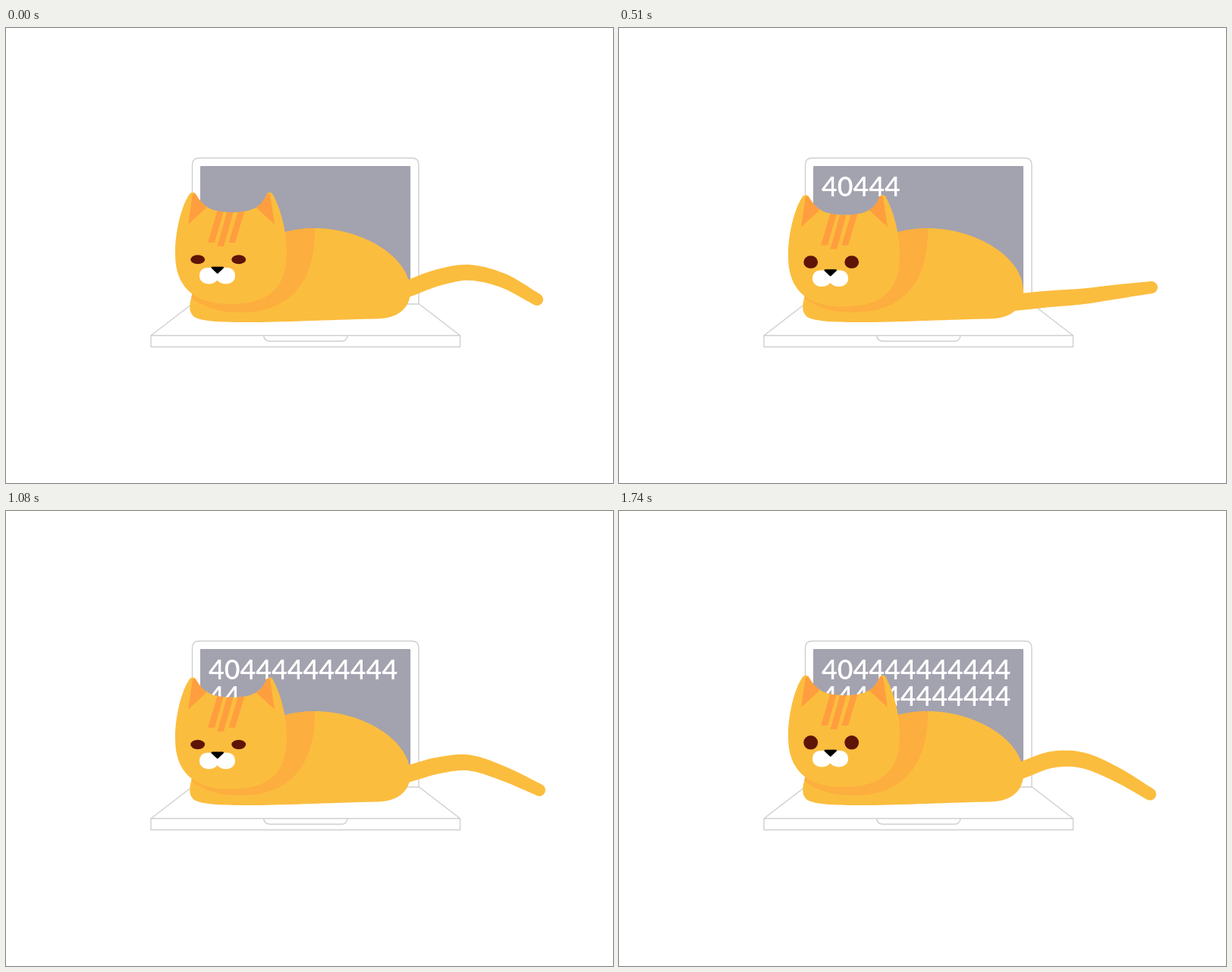
Animation of 800 by 600 pixels, one loop 1.8 s. Source, as an HTML page with a canvas:

```html
<!DOCTYPE html>
<html lang="en">
<head>
<meta charset="utf-8">
<title>Cat on a laptop</title>
<style>
html, body { margin: 0; width: 100%; height: 100%; overflow: hidden; background: #fff; }
canvas { display: block; width: 800px; height: 600px; }
</style>
</head>
<body>
<canvas id="stage" width="800" height="600"></canvas>
<script>
const ctx = document.getElementById('stage').getContext('2d');
const LOOP = 1800, STEP = 30, LAST = 1740;
const FUR = '#fbbd3e', SHADE = '#fcae3e', MARK = '#ff9e3e', EYE = '#5e1407';
const LINE = '#cfcfd1', SCREEN = '#a3a2af';

const body = new Path2D(`M246 350 L340 285 L366 269.5 Q386 264 407 264
  C470 264 533 302 533 347 C533 370 515 384 487 383.5
  C420 385 350 388.5 313 388 C285 388 252 387 246 379 C240 372 242 362 246 350Z`);
const shadow = new Path2D(`M340 250 L407 250 L407 264 C408 340 370 375 309 375
  C285 375 262 370 243 355 L243 330Z`);
const head = new Path2D(`M241.5 219.5 C231 235 222.5 270 223 298
  C223 340 246 364 295 364 C345 364 370 345 370 295
  C370 270 363 240 352 220 C350 216 345.5 216 343.5 219
  C338 234 326 243 300 243 C270 243 260 236 250 219 C248 216 244 216 241.5 219.5Z`);
const marks = new Path2D(`M246 219 L254 217 L264 237 L240 259Z
  M348 219 L340 217 L330 237 L354 259Z
  M280 236 h8.5 L275 283 h-9Z M293 236 h8.5 L287 288 h-8.5Z M307.5 236 h8.5 L302 283 h-8.5Z`);
const muzzle = new Path2D(`M266 316 L291 316 C298 316 302 320 302 327
  C302 333 297 337.5 290 337.5 C285 337.5 281 336 278.5 332.5
  C276 336 272 337.5 267 337.5 C260 337.5 255 333 255 327 C255 320 259 316 266 316Z`);
const nose = new Path2D(`M272 314.7 L285.5 314.7 Q288 315.2 286.4 317
  L279.8 323.3 Q278.7 324.3 277.6 323.3 L271 317 Q269.5 315.2 272 314.7Z`);
const laptop = new Path2D(`M245.5 364 V180.5 Q245.5 171.5 254.5 171.5 H535 Q544 171.5 544 180.5 V364
  M245 364 H544.5 L598.5 405.5 V420.5 H191 V405.5 L245 364 M191 405.5 H598.5
  M339.5 406 Q341 413 348 413 H442 Q449 413 450 406`);

// Each pose: time, heights of the tail at x = 530, 570, 610, 655, then the tip x, y
const tailPoses = [
  [0, 343.5, 329, 322.5, 333, 700, 358],
  [210, 352, 342, 337, 337, 700.5, 346],
  [510, 361, 357, 354, 348, 702, 342],
  [720, 356, 349.5, 345, 346, 703.5, 353],
  [1080, 346.5, 335.5, 332, 346, 703, 368],
  [1380, 342, 328, 328.5, 347, 700, 373.5]
];
const headKeys = [[0, 0], [820, 5], [1370, 0]];
const eyeKeys = [[0, 6], [120, 6], [600, 8.6], [960, 6], [1650, 9.3]];

// Cosine easing between keys
function ease(keys, t) {
  for (let i = 1; i < keys.length; i++) {
    const [t0, a] = keys[i - 1], [t1, b] = keys[i];
    if (t < t1) return a + (b - a) * (1 - Math.cos(Math.PI * (t - t0) / (t1 - t0))) / 2;
  }
  return keys[keys.length - 1][1];
}

// Smooth curve through rows; column 0 is the parameter
function spline(rows, u, col, flatEnds) {
  const n = rows.length - 1;
  if (u >= rows[n][0]) return rows[n][col];
  let i = 0;
  while (u >= rows[i + 1][0]) i++;
  const slope = k => {
    if (flatEnds && (k === 0 || k === n)) return 0;
    const a = rows[Math.max(0, k - 1)], b = rows[Math.min(n, k + 1)];
    return (b[col] - a[col]) / (b[0] - a[0]);
  };
  const d = rows[i + 1][0] - rows[i][0], s = (u - rows[i][0]) / d;
  const s2 = s * s, s3 = s2 * s;
  return (2 * s3 - 3 * s2 + 1) * rows[i][col] + (s3 - 2 * s2 + s) * d * slope(i)
    + (3 * s2 - 2 * s3) * rows[i + 1][col] + (s3 - s2) * d * slope(i + 1);
}

function fill(path, color) {
  ctx.fillStyle = color;
  ctx.fill(path);
}

function fillInside(clip, path, color) {
  ctx.save();
  ctx.clip(clip);
  fill(path, color);
  ctx.restore();
}

function drawTail(t) {
  const [y0, y1, y2, y3, tipX, tipY] = [1, 2, 3, 4, 5, 6].map(c => spline(tailPoses, t, c, true));
  const knots = [[505, y0 + (y0 - y1) * 0.6], [530, y0], [570, y1], [610, y2], [655, y3], [tipX, tipY]];
  const top = [], bottom = [], N = 60;
  let angle = 0;
  for (let i = 0; i <= N; i++) {
    const x = 505 + (tipX - 505) * i / N, y = spline(knots, x, 1);
    const xa = Math.min(x, tipX - 1);
    angle = Math.atan2(spline(knots, xa + 1, 1) - spline(knots, xa, 1), 1);
    const s = Math.max(0, (x - 530) / (tipX - 530)), w = 11 - 3 * s * s;
    top.push([x + Math.sin(angle) * w, y - Math.cos(angle) * w]);
    bottom.unshift([x - Math.sin(angle) * w, y + Math.cos(angle) * w]);
  }
  ctx.beginPath();
  top.forEach(p => ctx.lineTo(...p));
  ctx.arc(tipX, tipY, 8, angle - Math.PI / 2, angle + Math.PI / 2);
  bottom.forEach(p => ctx.lineTo(...p));
  ctx.fillStyle = FUR;
  ctx.fill();
}

function drawLaptop(t) {
  ctx.strokeStyle = LINE;
  ctx.lineWidth = 1.4;
  ctx.lineJoin = 'round';
  ctx.stroke(laptop);
  ctx.fillStyle = SCREEN;
  ctx.beginPath();
  ctx.roundRect(256, 182, 277, 168, 1);
  ctx.fill();

  const count = Math.max(0, Math.min(24, Math.floor((t - 130) * 3 / 200)));
  const text = ('40' + '4'.repeat(22)).slice(0, count);
  ctx.fillStyle = '#fff';
  ctx.font = '600 35.8px Lato, "Open Sans", sans-serif';
  ctx.fillText(text.slice(0, 12), 267, 222.3);
  ctx.fillText(text.slice(12), 267, 257.3);
}

function drawHead(t) {
  const ry = ease(eyeKeys, t);
  ctx.save();
  ctx.translate(0, ease(headKeys, t));
  fill(head, FUR);
  fillInside(head, marks, MARK);
  ctx.fillStyle = EYE;
  for (const x of [252.7, 306.7]) {
    ctx.beginPath();
    ctx.ellipse(x, 305.3, 9.4, ry, 0, 0, Math.PI * 2);
    ctx.fill();
  }
  fill(muzzle, '#fff');
  fill(nose, '#000');
  ctx.restore();
}

function draw(t) {
  ctx.fillStyle = '#fff';
  ctx.fillRect(0, 0, 800, 600);
  drawLaptop(t);
  drawTail(t);
  fill(body, FUR);
  fillInside(body, shadow, SHADE);
  drawHead(t);
}

const start = performance.now();
function tick() {
  const t = (performance.now() - start) % LOOP;
  draw(Math.min(LAST, Math.floor(t / STEP) * STEP));
  requestAnimationFrame(tick);
}
tick();
</script>
</body>
</html>
```
